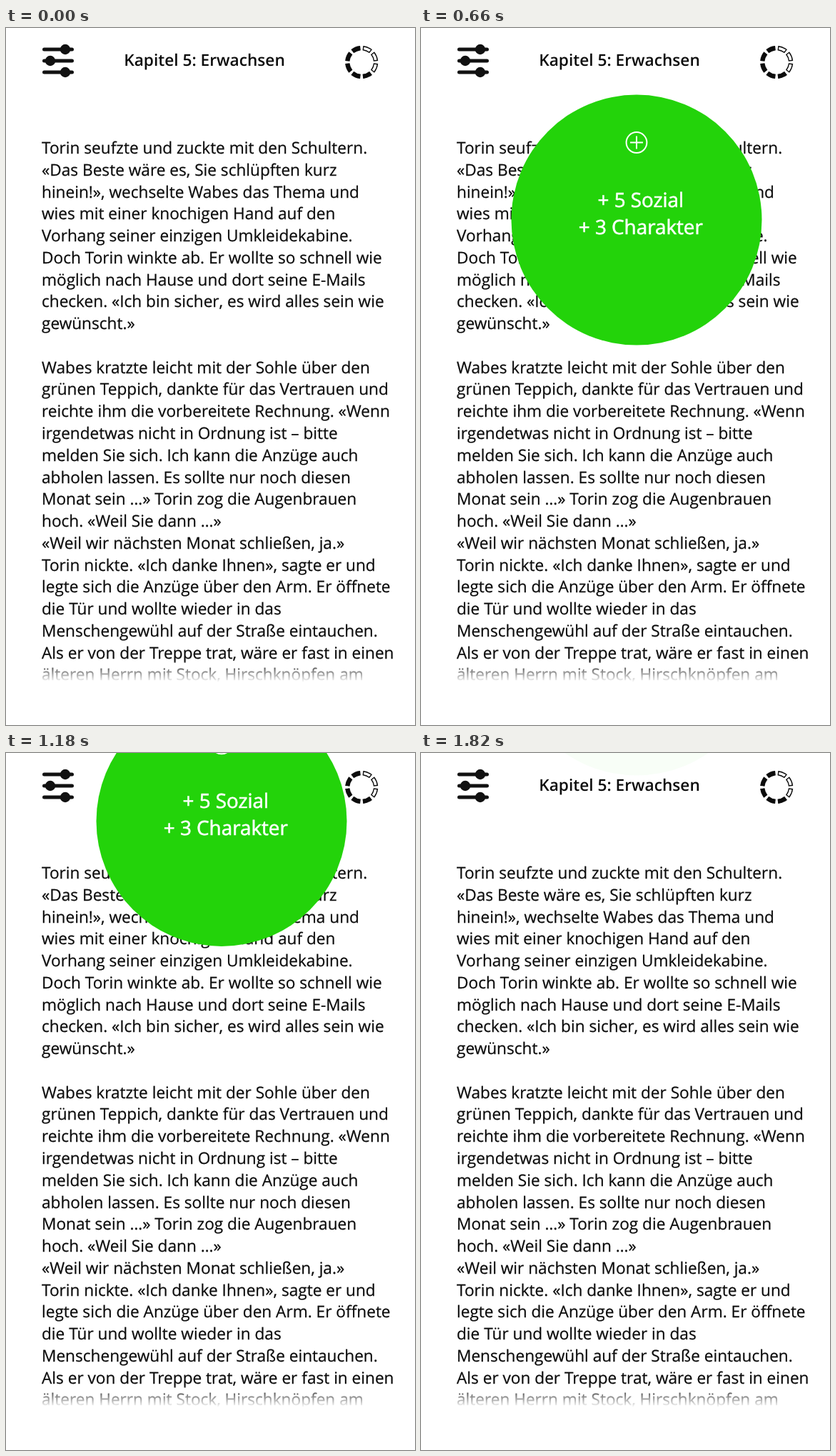
An HTML page for the animation above (2.62 s loop, 573 px wide and 977 px high).

```html
<!DOCTYPE html>
<html lang="de">
<head>
<meta charset="utf-8">
<title>Kapitel 5: Erwachsen</title>
<style>
  html, body { margin: 0; width: 100%; height: 100%; overflow: hidden; background: #fff; }
  svg { display: block; width: 573px; height: 977px; }
  text { font-family: "Open Sans", "Noto Sans", sans-serif; text-rendering: geometricPrecision; white-space: pre; }
  #story { font-size: 22.63px; fill: #0c0c0c; stroke: #0c0c0c; stroke-width: .25; }
  #title { font-size: 22.7px; font-weight: 600; text-anchor: middle; fill: #0c0c0c; }
  #badge text { font-size: 27.8px; text-anchor: middle; fill: #fff; stroke: #fff; stroke-width: .6; }
</style>
</head>
<body>
<svg viewBox="0 0 573 977">
  <defs>
    <linearGradient id="fade" x1="0" y1="0" x2="0" y2="1">
      <stop offset="0" stop-color="#fff" stop-opacity="0"/>
      <stop offset="1" stop-color="#fff"/>
    </linearGradient>
  </defs>
  <g id="story"></g>
  <rect x="0" y="886" width="573" height="31" fill="url(#fade)"/>
  <rect x="0" y="917" width="573" height="60" fill="#fff"/>

  <g fill="#111" stroke="#111" stroke-width="5" stroke-linecap="round">
    <path d="M53.5 30H92.5M53.5 46H92.5M53.5 62H92.5"/>
    <g stroke="none">
      <circle cx="83" cy="30" r="7.2"/>
      <circle cx="62" cy="46" r="7.2"/>
      <circle cx="83" cy="62" r="7.2"/>
    </g>
  </g>
  <text id="title" x="278" y="53">Kapitel 5: Erwachsen</text>
  <g id="ring" transform="translate(498.2 48)" stroke="#0c0c0c" stroke-width="1.4"></g>

  <g id="badge" visibility="hidden">
    <circle r="175.5" fill="#23d30a"/>
    <g fill="none" stroke="#fff" stroke-width="2">
      <circle cy="-108.5" r="14.4"/>
      <path d="M-9 -108.5H9M0 -117.5V-99.5"/>
    </g>
    <text x="5.8" y="-18.5">+ 5 Sozial</text>
    <text x="5.8" y="19.5">+ 3 Charakter</text>
  </g>
</svg>
<script>
const NS = "http://www.w3.org/2000/svg";
const $ = id => document.getElementById(id);

function add(parent, tag, attrs, content = "") {
  const el = document.createElementNS(NS, tag);
  for (const key in attrs) el.setAttribute(key, attrs[key]);
  el.textContent = content;
  parent.append(el);
}

const story = `Torin seufzte und zuckte mit den Schultern.
«Das Beste wäre es, Sie schlüpften kurz
hinein!», wechselte Wabes das Thema und
wies mit einer knochigen Hand auf den
Vorhang seiner einzigen Umkleidekabine.
Doch Torin winkte ab. Er wollte so schnell wie
möglich nach Hause und dort seine E-Mails
checken. «Ich bin sicher, es wird alles sein wie
gewünscht.»

Wabes kratzte leicht mit der Sohle über den
grünen Teppich, dankte für das Vertrauen und
reichte ihm die vorbereitete Rechnung. «Wenn
irgendetwas nicht in Ordnung ist – bitte
melden Sie sich. Ich kann die Anzüge auch
abholen lassen. Es sollte nur noch diesen
Monat sein …» Torin zog die Augenbrauen
hoch. «Weil Sie dann …»
«Weil wir nächsten Monat schließen, ja.»
Torin nickte. «Ich danke Ihnen», sagte er und
legte sich die Anzüge über den Arm. Er öffnete
die Tür und wollte wieder in das
Menschengewühl auf der Straße eintauchen.
Als er von der Treppe trat, wäre er fast in einen
älteren Herrn mit Stock, Hirschknöpfen am`;

story.split("\n").forEach((line, i) =>
  add($("story"), "text", { x: 50, y: 176 + i * 30.77 }, line));

// Eight chapters clockwise from the top: three open, five done
const polar = (r, deg) => {
  const a = deg * Math.PI / 180;
  return `${(r * Math.sin(a)).toFixed(2)} ${(-r * Math.cos(a)).toFixed(2)}`;
};
for (let i = 0; i < 8; i++) {
  const from = i * 45 + 7, to = i * 45 + 38;
  add($("ring"), "path", {
    d: `M${polar(22.4, from)}A22.4 22.4 0 0 1 ${polar(22.4, to)}` +
       `L${polar(17.4, to)}A17.4 17.4 0 0 0 ${polar(17.4, from)}Z`,
    fill: i < 3 ? "#fff" : "#0c0c0c"
  });
}

const LOOP = 2620, STEP = 20, LAST = 1820;
const badge = $("badge");

const ramp = (t, start, length) => Math.min(1, Math.max(0, (t - start) / length));

function ease(t, start, length) {
  const p = ramp(t, start, length);
  return p * p * (3 - 2 * p);
}

function draw(time) {
  const t = Math.min(LAST, Math.floor(time % LOOP / STEP) * STEP);
  const grow = ease(t, 0, 320);
  const x = 302 - 12.7 * (1 - grow);
  const y = 285.5 + 201 * (1 - grow) - 458 * ease(t, 480, 1580);
  badge.setAttribute("visibility", grow > 0 ? "visible" : "hidden");
  badge.setAttribute("transform", `translate(${x} ${y}) scale(${grow})`);
  badge.setAttribute("opacity", 1 - ramp(t, 1220, 620));
}

const start = performance.now();
function tick() {
  draw(performance.now() - start);
  requestAnimationFrame(tick);
}
tick();
</script>
</body>
</html>
```
